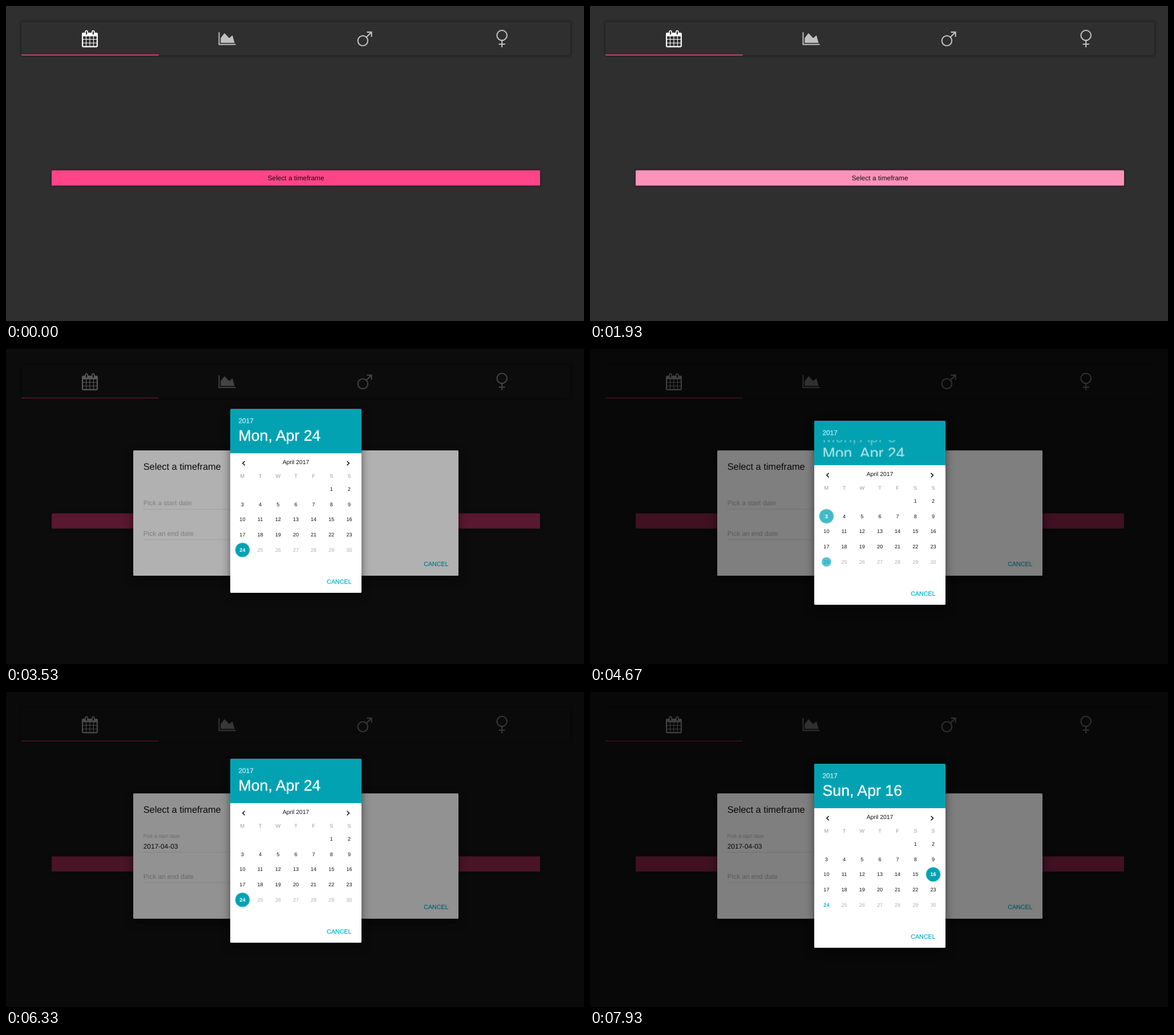
Recreate the animation shown at these times as an HTML page. Size 1013x553 px, loop 8 s.

```html
<!DOCTYPE html>
<html lang="en">
<head>
<meta charset="utf-8">
<title>Timeframe picker</title>
<style>
html, body { margin: 0; width: 100%; height: 100%; overflow: hidden; background: #2f2f2f; }
svg { display: block; width: 1013px; height: 553px; font: 11.87px "Liberation Sans", Arial, sans-serif; text-rendering: geometricPrecision; }
:root { --ease: cubic-bezier(.23, 1, .32, 1); --pink: #ff4487; --teal: #02a2b3; --cyan: #12b5cc; }

.page { animation: page 8s var(--ease) infinite; }
.tabs { filter: drop-shadow(0 .6px 2px rgba(0, 0, 0, .65)); }
.tab { fill: #c1c1c1; }
.line { fill: none; stroke: #c1c1c1; stroke-width: 2.1; }
.raised { filter: drop-shadow(0 .8px 2px rgba(0, 0, 0, .5)); }
.mid { text-anchor: middle; }
.end { text-anchor: end; }
.hint { fill: #b5b5b5; }
.action { font-size: 10.6px; fill: var(--cyan); stroke: var(--cyan); stroke-width: .3; }
.paper { filter: drop-shadow(0 6px 8px rgba(0, 0, 0, .5)); }
.small { font-size: 9.1px; }

.hover { animation: hover 8s var(--ease) infinite; }
.shade1 { animation: shade1 8s var(--ease) infinite; }
.shade2 { animation: shade2 8s var(--ease) infinite; }
.dialog { animation: dialog 8s var(--ease) infinite; }
.picker { animation: picker 8s var(--ease) infinite; }
.label { animation: label 8s var(--ease) infinite; }
.value { animation: value 8s step-end infinite; }
.title { font-size: 26.7px; fill: #fff; stroke: #fff; stroke-width: .35; }
.old { animation: old 8s var(--ease) infinite; }
.first { animation: first 8s var(--ease) infinite; }
.second { animation: second 8s var(--ease) infinite; }
.day circle { fill: var(--teal); }
.d24 circle { animation: dot24 8s var(--ease) infinite; }
.d3 circle { animation: dot3 8s var(--ease) infinite; }
.d16 circle { animation: dot16 8s var(--ease) infinite; }
.d24 text { font-weight: bold; animation: num24 8s step-end infinite; }
.d3 text { animation: num3 8s step-end infinite; }
.d16 text { animation: num16 8s step-end infinite; }

@keyframes page { 0%, 24.375% { fill: #2f2f2f } 29.375%, 100% { fill: #222 } }
@keyframes hover { 0%, 11% { opacity: 0 } 16.625%, 24.375% { opacity: .42 } 30%, 100% { opacity: 0 } }
@keyframes shade1 { 0%, 24.375% { opacity: 0 } 29.375%, 100% { opacity: .5 } }
@keyframes shade2 {
  0%, 43.29% { opacity: 0 } 48.29%, 63.5% { opacity: .5 }
  68.5%, 77.59% { opacity: 0 } 82.59%, 100% { opacity: .5 }
}
@keyframes dialog {
  0%, 24.37% { opacity: 0; transform: translateY(-47.5px) }
  24.375% { opacity: 1; transform: translateY(-47.5px) }
  30%, 100% { opacity: 1; transform: translateY(0) }
}
@keyframes picker {
  0%, 43.28% { opacity: 0; transform: translateY(-47.5px) }
  43.29% { opacity: 1; transform: translateY(-47.5px) }
  48.91%, 63.5% { opacity: 1; transform: translateY(0) }
  69.125%, 77.58% { opacity: 0; transform: translateY(-47.5px) }
  77.59% { opacity: 1; transform: translateY(-47.5px) }
  83.21%, 100% { opacity: 1; transform: translateY(0) }
}
@keyframes label {
  0%, 63.5% { transform: translate(240.7px, 274.3px) scale(1) }
  69.125%, 100% { transform: translate(240.7px, 255.8px) scale(.75) }
}
@keyframes value { 0% { opacity: 0 } 63.5%, 100% { opacity: 1 } }
@keyframes old {
  0%, 57.91% { opacity: 1; transform: translateY(0) }
  63.54%, 75% { opacity: 0; transform: translateY(28.2px) }
  75.01%, 94.375% { opacity: 1; transform: translateY(0) }
  100% { opacity: 0; transform: translateY(28.2px) }
}
@keyframes first {
  0%, 57.91% { opacity: 0; transform: translateY(-28.2px) }
  63.54%, 75% { opacity: 1; transform: translateY(0) }
  75.01%, 100% { opacity: 0; transform: translateY(0) }
}
@keyframes second {
  0%, 94.375% { opacity: 0; transform: translateY(-28.2px) }
  100% { opacity: 1; transform: translateY(0) }
}
@keyframes dot24 {
  0%, 57.91% { opacity: 1; transform: scale(1) }
  63.54%, 75% { opacity: 0; transform: scale(0) }
  75.01%, 94.375% { opacity: 1; transform: scale(1) }
  100% { opacity: 0; transform: scale(0) }
}
@keyframes dot3 {
  0%, 52% { opacity: 0; transform: scale(0) }
  57.625%, 57.91% { opacity: .6; transform: scale(1) }
  63.54%, 75% { opacity: 1; transform: scale(1) }
  75.01%, 100% { opacity: 0; transform: scale(0) }
}
@keyframes dot16 {
  0%, 88.5% { opacity: 0; transform: scale(0) }
  94.125%, 94.375% { opacity: .6; transform: scale(1) }
  100% { opacity: 1; transform: scale(1) }
}
@keyframes num24 { 0%, 75% { fill: #fff } 57.91%, 94.375%, 100% { fill: var(--cyan) } }
@keyframes num3 { 0%, 75%, 100% { fill: #111; font-weight: 400 } 52% { fill: #fff; font-weight: 700 } }
@keyframes num16 { 0% { fill: #111; font-weight: 400 } 88.5%, 100% { fill: #fff; font-weight: 700 } }
</style>
</head>
<body>
<svg viewBox="0 0 1013 553">
  <defs><clipPath id="slot"><rect x="400" y="160.5" width="215" height="28.3"/></clipPath></defs>
  <rect class="page" width="1013" height="553"/>

  <g class="tabs"><rect class="page" x="27" y="28" width="962.5" height="58.7"/></g>
  <rect x="27" y="85.3" width="240.5" height="1.5" fill="var(--pink)"/>
  <path fill="#fff" fill-rule="evenodd" transform="translate(131.9 42.4) scale(.0168)"
    d="M64 1664V384Q64 256 192 256H384V160Q384 0 544 0T704 160V256H1088V160Q1088 0 1248 0T1408 160V256H1600Q1728 256 1728 384V1664Q1728 1792 1600 1792H192Q64 1792 64 1664Z
    M192 640h288v288h-288zM544 640h320v288h-320zM928 640h320v288h-320zM1312 640h288v288h-288z
    M192 992h288v320h-288zM544 992h320v320h-320zM928 992h320v320h-320zM1312 992h288v320h-288z
    M192 1376h288v288h-288zM544 1376h320v288h-320zM928 1376h320v288h-320zM1312 1376h288v288h-288z
    M480 128h128v320h-128zM1184 128h128v320h-128z"/>
  <path class="tab" transform="translate(372.5 44.1) scale(.01465)"
    d="M2048 1536v128H0V128h128v1408zM1664 512l256 896H256V832l448-576 576 576z"/>
  <path class="line" d="M631.9 54.6L640.4 46M632.5 45.9H640.6V54"/>
  <circle class="line" cx="625.4" cy="61" r="8.7"/>
  <path class="line" d="M869.2 60.3V72.4M863.6 67H874.8"/>
  <circle class="line" cx="869.2" cy="51.6" r="8.8"/>

  <rect class="raised" x="80" y="288.5" width="856" height="26.8" rx="1.5" fill="var(--pink)"/>
  <rect class="hover" x="80" y="288.5" width="856" height="26.8" rx="1.5" fill="#fff"/>
  <text class="mid" x="508.1" y="305.5" fill="#111">Select a timeframe</text>

  <rect class="shade1" width="1013" height="553"/>
  <g class="dialog">
    <rect class="paper" x="223" y="178" width="570" height="220" rx="1.5" fill="#fff"/>
    <text x="240.7" y="212" font-size="16.32" fill="#111">Select a timeframe</text>
    <text class="hint label">Pick a start date</text>
    <text class="value" x="240.7" y="275.2" fill="#111">2017-04-03</text>
    <text class="hint" x="240.7" y="327.7">Pick an end date</text>
    <path d="M240.5 281.4H430.7M240.5 334.8H430.7" stroke="#ddd" stroke-width=".8"/>
    <text class="action end" x="775.3" y="381.3">CANCEL</text>
  </g>

  <rect class="shade2" width="1013" height="553"/>
  <g class="picker">
    <rect class="paper" x="393" y="126.5" width="230" height="322.4" rx="1.5" fill="#fff"/>
    <path d="M393 204V128q0-1.5 1.5-1.5h227q1.5 0 1.5 1.5V204z" fill="var(--teal)"/>
    <text x="407.5" y="150.8" fill="#fff" stroke="#fff" stroke-width=".4" opacity=".7">2017</text>
    <g class="title" clip-path="url(#slot)">
      <text class="old" x="407.5" y="182">Mon, Apr 24</text>
      <text class="first" x="407.5" y="182">Mon, Apr 3</text>
      <text class="second" x="407.5" y="182">Sun, Apr 16</text>
    </g>
    <text class="mid" x="508" y="223.1" font-size="10.39" fill="#111">April 2017</text>
    <path d="M418.6 217.7L414.8 221.5L418.6 225.3M597.6 217.7L601.4 221.5L597.6 225.3" fill="none" stroke="#111" stroke-width="1.6"/>
    <g class="small mid" id="days"></g>
    <text class="action end" x="605.3" y="432.6">CANCEL</text>
  </g>
</svg>
<script>
const days = document.getElementById('days');
const colX = col => 414.4 + col * 31.18;

function add(parent, tag, attrs, text = '') {
  const el = document.createElementNS('http://www.w3.org/2000/svg', tag);
  for (const key in attrs) el.setAttribute(key, attrs[key]);
  el.textContent = text;
  return parent.appendChild(el);
}

[...'MTWTFSS'].forEach((name, col) => add(days, 'text', { x: colX(col), y: 247.4, fill: '#999' }, name));

for (let n = 1; n <= 30; n++) {
  const cell = n + 4, y = 266.8 + Math.floor(cell / 7) * 26.72;
  const day = add(days, 'g', { class: 'day d' + n, transform: `translate(${colX(cell % 7)} ${y})` });
  if ([3, 16, 24].includes(n)) add(day, 'circle', { r: 12.6 });
  add(day, 'text', { y: 3.2, fill: n > 24 ? '#b0b0b0' : '#111' }, n);
}
</script>
</body>
</html>
```
